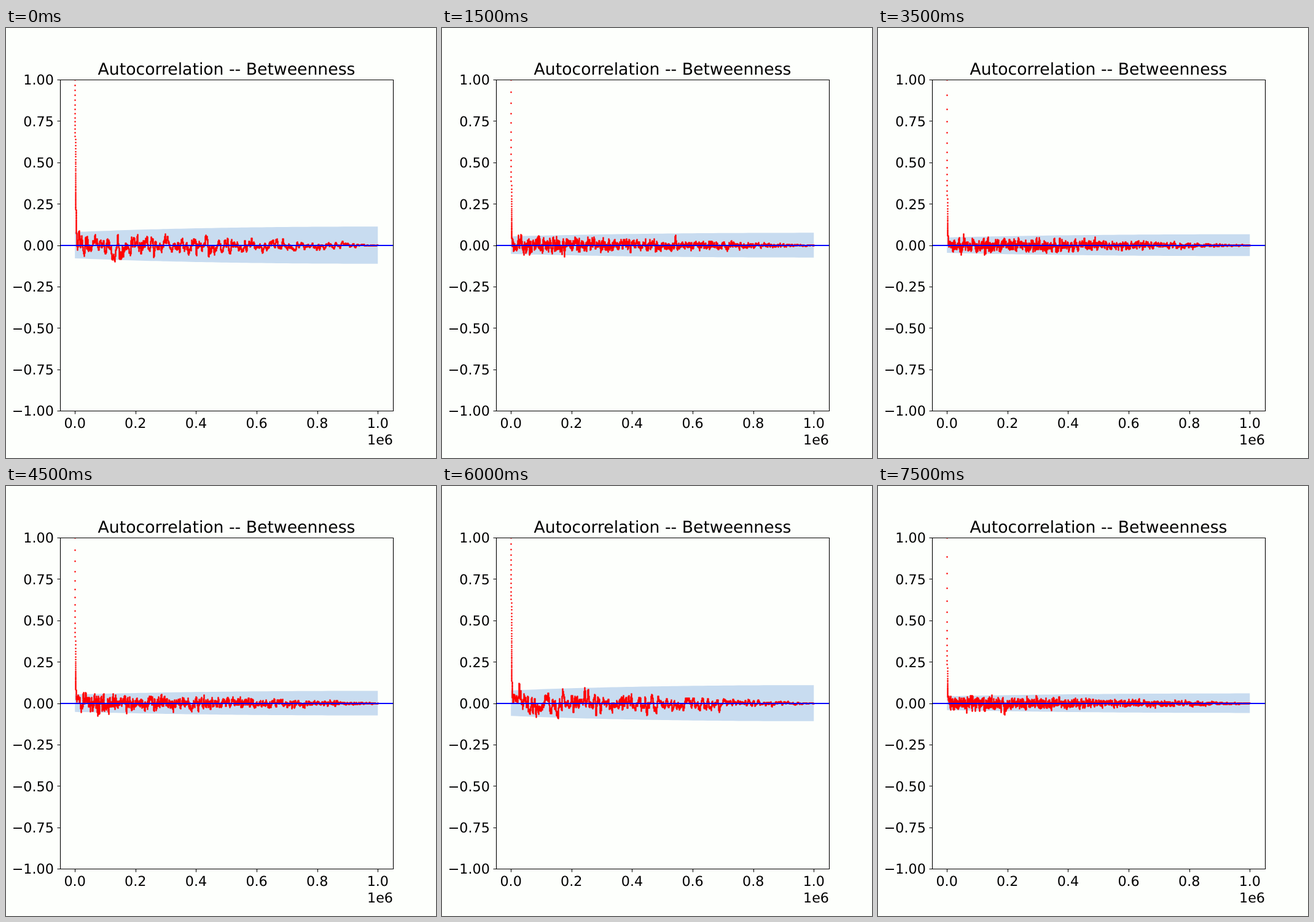
An HTML page for the animation above (8000 ms loop, 700 px wide and 700 px high).

```html
<!DOCTYPE html>
<html lang="en">
<head>
<meta charset="utf-8">
<title>Autocorrelation</title>
<style>
  html, body { margin: 0; width: 100%; height: 100%; overflow: hidden; background: #fdfffc; }
  svg { display: block; width: 100vw; height: 100vh; }
  text { font-family: "DejaVu Sans", sans-serif; font-size: 22.22px; fill: #000; text-rendering: geometricPrecision; }
  .title { font-size: 26.67px; text-anchor: middle; }
  .end { text-anchor: end; }
  .mid { text-anchor: middle; }
</style>
</head>
<body>
<svg viewBox="0 0 700 700">
  <defs><clipPath id="plot"><rect x="88" y="84" width="542.5" height="539.5"/></clipPath></defs>
  <g clip-path="url(#plot)">
    <path id="band" fill="#c8dcf0"/>
    <path id="dots" fill="none" stroke="#f00" stroke-width="2.6" stroke-linecap="round"/>
    <path d="M88 354H630.5" stroke="#00f" stroke-width="2"/>
  </g>
  <path id="axes" fill="none" stroke="#000" stroke-width="1.1"/>
  <g id="labels"></g>
</svg>
<script>
const STEP = 500;
const X0 = 112.16, SPAN = 493.18, Y0 = 353.5, UNIT = 269.5;
const LAGS = 20000;
const TAIL = 80;      // lags over which the slow part of the decay fades

// Four runs of four panels; in each run the loss per lag grows from one end to the other.
const RUN = 4;
const LOSS = [[.033, .073], [.045, .093], [.044, .112], [.035, .115]];

const $ = id => document.getElementById(id);
const snap = v => Math.round(v) + 0.5;

function random(seed) {
  return () => {
    seed = seed + 0x6D2B79F5 | 0;
    let t = Math.imul(seed ^ seed >>> 15, 1 | seed);
    t = t + Math.imul(t ^ t >>> 7, 61 | t) ^ t;
    return ((t ^ t >>> 14) >>> 0) / 4294967296;
  };
}

// Noise of unit variance: random steps passed twice through the same decay.
function noise(rand, keep) {
  const out = [];
  let a = 0, b = 0, power = 0;
  for (let i = -500; i < LAGS; i++) {
    a = keep * a + rand() + rand() + rand() - 1.5;
    b = keep * b + a;
    if (i >= 0) {
      out.push(b);
      power += b * b;
    }
  }
  const rms = Math.sqrt(power / LAGS);
  return out.map(v => v / rms);
}

function bandPath(base) {
  const upper = [], lower = [];
  for (let i = 0; i <= 60; i++) {
    const u = i / 60;
    const h = base * Math.sqrt(1.1 * (2 - (1 - u) ** 2));
    const x = (X0 + u * SPAN).toFixed(1);
    upper.push(`${x} ${(Y0 - h).toFixed(2)}`);
    lower.unshift(`${x} ${(Y0 + h).toFixed(2)}`);
  }
  return `M${upper.join("L")}L${lower.join("L")}Z`;
}

function makePanel(index) {
  const [from, to] = LOSS[Math.floor(index / RUN)];
  const grow = (index % RUN / (RUN - 1)) ** 0.75;
  const keep = 1 - from - (to - from) * grow;

  const deviation = UNIT * Math.sqrt((1 + keep ** 2) / (1 - keep ** 2) / LAGS);
  const weight = 0.2 - 0.12 * grow;
  const slow = Math.exp(-1 / TAIL);
  const fast = (keep - weight * slow) / (1 - weight);
  const wave = noise(random(917 + index * 31), keep);

  // Markers sit on whole pixels, so repeats can be dropped.
  const spots = new Set();
  for (let lag = 0; lag < LAGS; lag++) {
    const u = lag / LAGS;
    const decay = UNIT * ((1 - weight) * fast ** lag + weight * slow ** lag);
    const taper = (1 - u) ** 0.75 * (1 - Math.exp(-lag / TAIL));
    const y = Y0 - decay - deviation * taper * wave[lag];
    spots.add(`M${snap(X0 + u * SPAN)} ${snap(y)}h0`);
  }
  return { band: bandPath(1.96 * deviation), dots: [...spots].join("") };
}

function drawAxes() {
  let ticks = "M88.5 84.5H630.5V623.5H88.5Z", labels = "";
  const label = (x, y, kind, text) => {
    labels += `<text x="${x}" y="${y}" class="${kind}">${text}</text>`;
  };
  for (let i = 0; i <= 8; i++) {
    const value = 1 - i / 4, y = 84 + i * UNIT / 4;
    ticks += `M88.5 ${snap(y)}h-5`;
    label(77.8, Math.round(y + 8.4), "end", value.toFixed(2).replace("-", "\u2212"));
  }
  for (let i = 0; i <= 5; i++) {
    const x = X0 + i * SPAN / 5;
    ticks += `M${snap(x)} 623.5v5`;
    label(x, 651, "mid", (i / 5).toFixed(1));
  }
  label(630, 678, "end", "1e6");
  label(359, 76, "title", "Autocorrelation -- Betweenness");
  $("axes").setAttribute("d", ticks);
  $("labels").innerHTML = labels;
}

const panels = Array.from({ length: RUN * LOSS.length }, (_, i) => makePanel(i));
let shown = -1;

function render(time) {
  const index = Math.floor(time / STEP) % panels.length;
  if (index === shown) return;
  shown = index;
  for (const [id, d] of Object.entries(panels[index])) $(id).setAttribute("d", d);
}

drawAxes();
render(0);
const began = performance.now();
(function tick() {
  render(performance.now() - began);
  requestAnimationFrame(tick);
})();
</script>
</body>
</html>
```
